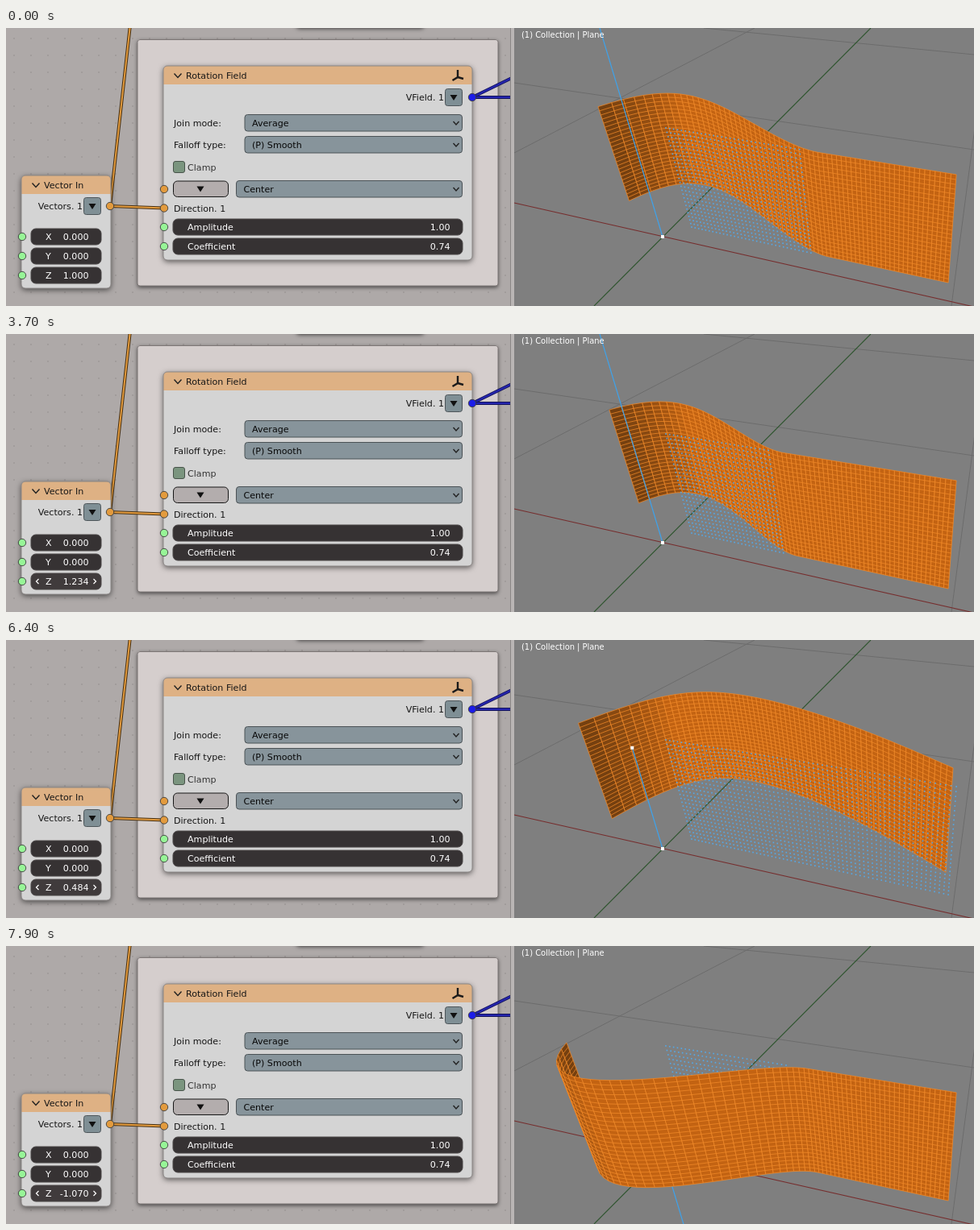
Recreate the animation shown at these times as an HTML page with a canvas. Size 1200 px wide and 345 px high, loop 8 s.

```html
<!DOCTYPE html>
<html lang="en">
<head>
<meta charset="utf-8">
<title>Rotation field</title>
<style>
html, body { margin: 0; width: 100%; height: 100%; overflow: hidden; background: #7f7f7f; }
canvas { display: block; }
</style>
</head>
<body>
<canvas id="stage" width="1200" height="345"></canvas>
<script>
const g = document.getElementById('stage').getContext('2d');
const LOOP = 8000, COLS = 64, ROWS = 25;
const X0 = 0.0758, LEN = 1.038, DEPTH = 0.0722, HEIGHT = 0.485;

// Z value over time: [ms, value]
const KEYS = [[0, 1], [2400, 1], [2500, 1.003], [2900, 1.003], [3700, 1.234], [4700, 1.9],
  [4800, 1.912], [5000, 1.912], [5800, 1], [6400, 0.484], [7200, -0.287], [7900, -1.07]];

function zAt(t) {
  const i = KEYS.findIndex(k => k[0] >= t);
  if (i < 1) return KEYS[0][1];
  const [t0, a] = KEYS[i - 1], [t1, b] = KEYS[i];
  return a + (b - a) * (t - t0) / (t1 - t0);
}

// ---------- drawing helpers ----------
function line(pts, color, width = 1) {
  g.beginPath();
  pts.forEach(p => g.lineTo(p[0], p[1]));
  g.strokeStyle = color;
  g.lineWidth = width;
  g.stroke();
}

function box(x, y, x2, y2, r, fill, border) {
  g.beginPath();
  g.roundRect(x, y, x2 - x, y2 - y, r);
  g.fillStyle = fill;
  g.fill();
  if (border) {
    g.strokeStyle = border;
    g.lineWidth = 1;
    g.stroke();
  }
}

function text(s, x, y, color = '#161616', align = 'left', size = 11.1) {
  g.font = size + 'px "DejaVu Sans", sans-serif';
  g.textAlign = align;
  g.textBaseline = 'alphabetic';
  g.fillStyle = color;
  g.fillText(s, x, y);
}

function socket(x, y, color) {
  g.beginPath();
  g.arc(x, y, 4.7, 0, 7);
  g.fillStyle = color;
  g.fill();
  g.strokeStyle = '#3c3c3c';
  g.lineWidth = 0.9;
  g.stroke();
}

function triangle(x, y) {
  g.beginPath();
  g.moveTo(x - 4.5, y - 3);
  g.lineTo(x + 4.5, y - 3);
  g.lineTo(x, y + 4);
  g.fillStyle = '#111';
  g.fill();
}

function chevron(x, y, w, h, color = '#222') {
  line([[x - w, y - h], [x, y + h], [x + w, y - h]], color, 1.4);
}

function wire(pts, dark, light) {
  line(pts, dark, 4);
  line(pts, light, 2);
}

function shadow(on, blur = 7) {
  g.shadowColor = on ? 'rgba(0,0,0,.6)' : 'transparent';
  g.shadowBlur = on ? blur : 0;
  g.shadowOffsetY = on ? 2 : 0;
}

// ---------- node editor ----------
function node(x, y, x2, y2, title) {
  shadow(true);
  box(x, y, x2, y2, 5, '#d4d4d4');
  shadow(false);
  box(x, y, x2, y + 23, [5, 5, 0, 0], '#deb184');
  box(x, y, x2, y2, 5, 'transparent', '#8b8786');
  chevron(x + 18, y + 12, 4.5, 2.5);
  text(title, x + 28, y + 15.5);
}

function dropButton(x, y) {
  box(x, y, x + 21, y + 21, 3, '#7f8f95', '#4d5559');
  triangle(x + 10.5, y + 10.5);
}

function menu(x, y, label) {
  box(x, y, 565.5, y + 20.5, 3.5, '#87949b', '#4b5256');
  text(label, x + 9, y + 14.5, '#080808');
  chevron(558, y + 10.5, 3.5, 2);
}

function field(x, y, x2, label, value, hover) {
  box(x, y, x2, y + 20, 6, hover ? '#403b3c' : '#363233', '#4a4647');
  text(label, x + 18, y + 14, '#fff');
  text(value, x2 - 15.5, y + 14, '#fff', 'right');
  if (!hover) return;
  for (const [cx, d] of [[x + 8, 1], [x2 - 8, -1]])
    line([[cx + 1.5 * d, y + 7], [cx - 1.5 * d, y + 10], [cx + 1.5 * d, y + 13]], '#fff', 1.2);
}

function editor(t, z) {
  g.fillStyle = '#aea9a8';
  g.fillRect(0, 0, 630, 345);
  g.fillStyle = '#a19c9b';
  for (let x = 9; x < 625; x += 21)
    for (let y = 12; y < 345; y += 21) g.fillRect(x, y, 2, 2);

  shadow(true, 5);
  box(360, -12, 518, -1, 4, '#8d8988');
  box(163, 14, 610, 320, 3, '#d5cecd');
  shadow(false);
  box(163, 14.5, 610, 320, 3, 'transparent', '#7d7776');

  const brown = '#4a3213', amber = '#e29a3d';
  wire([[129, 221], [132, 194], [142, 104], [154, -4]], brown, amber);
  wire([[129, 221], [196, 223.5]], brown, amber);
  wire([[578, 86], [628, 61.5]], '#14145e', '#2525ae');
  wire([[578, 86], [628, 86]], '#14145e', '#2525ae');

  node(195, 47, 578, 288, 'Rotation Field');
  line([[560, 52], [560, 61], [553.5, 65]], '#1b1b1b', 2.4);
  line([[560, 61], [567, 63]], '#1b1b1b', 2.4);
  text('VField. 1', 543, 89.5, undefined, 'right');
  dropButton(544.5, 75.5);
  text('Join mode:', 208, 122);
  menu(296, 107.5, 'Average');
  text('Falloff type:', 208, 149);
  menu(296, 134.5, '(P) Smooth');
  box(207.5, 165.5, 221.5, 179.5, 2.5, '#7b957f', '#48534a');
  text('Clamp', 225, 177, '#343434');
  box(207.5, 190, 275.5, 209.5, 5, '#b3adad', '#161616');
  triangle(241, 199.5);
  menu(285.5, 189.5, 'Center');
  text('Direction. 1', 208, 227.5);
  field(207, 237, 566, 'Amplitude', '1.00');
  field(207, 261, 566, 'Coefficient', '0.74');

  node(19, 183, 130, 323, 'Vector In');
  text('Vectors. 1', 95, 225, undefined, 'right');
  dropButton(96.5, 210.5);
  field(31, 249, 118, 'X', '0.000');
  field(31, 273, 118, 'Y', '0.000', t >= 1600 && t < 1800);
  field(31, 297, 118, 'Z', z.toFixed(3), t >= 1800);

  const orange = '#e39b3e', green = '#97f597';
  [[129, 221], [196, 200], [196, 223.5]].forEach(p => socket(...p, orange));
  [[196, 247], [196, 271], [20, 259], [20, 283], [20, 307]].forEach(p => socket(...p, green));
  socket(578, 86, '#1c1ce8');

  g.fillStyle = '#b9b5b4';
  g.fillRect(626, 0, 4, 345);
  g.fillStyle = '#8a8786';
  g.fillRect(625, 0, 1, 345);
}

// ---------- 3D view ----------
// Perspective through the three vanishing points of the axes.
function project(x, y, z) {
  const a = -0.13 * x, b = 0.54 * y, c = -0.24 * z, w = 1 + a + b + c;
  return [(814 - 1258 * a + 1240 * b + 1101 * c) / w,
          (259 - 210 * a - 175 * b + 1212 * c) / w];
}

// Shift of the sheet at distance u along it, with smooth falloff.
function push(u, z) {
  const m = Math.max(Math.abs(z), 0.02);
  const power = Math.min(1.6, Math.max(1, 2.16 - 1.16 * m));
  const k = Math.min(1, (Math.hypot(X0 + LEN * u, DEPTH) * m / 0.67) ** power);
  const f = 1 - k * k * (3 - 2 * k);
  const turn = 1 - (1 - 0.15 * m * m) * Math.exp(-8 * u);
  return { f, dx: -0.41 * f * (1 - 0.05 * m * m) * (1 - 0.75 * u * u),
           dy: 0.46 * f * turn * (z < 0 ? -1 : 1) };
}

function column(i, z) {
  const u = i / COLS, p = push(u, z), pts = [];
  for (let j = 0; j <= ROWS; j++)
    pts.push(project(X0 + LEN * u + p.dx, DEPTH + p.dy, HEIGHT * (1 - j / ROWS)));
  return pts;
}

function mesh(z) {
  let prev = column(0, z);
  for (let i = 1; i <= COLS; i++) {
    const next = column(i, z), s = Math.min(1, 0.1 + i / COLS / 0.16);
    g.beginPath();
    [prev[0], next[0], next[ROWS], prev[ROWS]].forEach(p => g.lineTo(...p));
    g.fillStyle = `rgb(${98 + 97 * s},${56 + 43 * s},${16 + 2 * s})`;
    g.fill();
    g.beginPath();
    for (let j = 0; j <= ROWS; j++) {
      g.moveTo(...prev[j]);
      g.lineTo(...next[j]);
    }
    for (const c of [prev, next]) {
      g.moveTo(...c[0]);
      g.lineTo(...c[ROWS]);
    }
    g.strokeStyle = '#f28a29';
    g.lineWidth = 0.75;
    g.stroke();
    prev = next;
  }
}

function restDots(z) {
  g.fillStyle = '#52a9ea';
  for (let i = 0; i <= COLS; i++) {
    const u = i / COLS;
    if (push(u, z).f < 0.03) continue;
    for (let j = 0; j <= ROWS; j++) {
      const [x, y] = project(X0 + LEN * u, DEPTH, HEIGHT * j / ROWS);
      g.fillRect(x - 0.8, y - 0.8, 1.6, 1.6);
    }
  }
}

function arrow(z) {
  const from = project(0, 0, 0), to = project(0, 0, z);
  line([from, to], '#3fa2ea', 1.2);
  g.fillStyle = '#fff';
  for (const [x, y] of [from, to]) g.fillRect(x - 2, y - 2, 4, 4);
}

function view(z) {
  g.fillStyle = '#7f7f7f';
  g.fillRect(630, 0, 570, 345);
  const grid = '#6c6c6c';
  line([[630, 68], [1200, 151]], grid);
  line([[865, 0], [1200, 33]], grid);
  line([[630, 155], [928, 0]], grid);
  line([[1172, 345], [1212, 40]], grid);
  line([[630, 217], [1200, 346]], '#762e2e', 1.1);
  line([[729, 345], [1072, 0]], '#2f552f', 1.1);
  if (z < 0) {
    restDots(z);
    arrow(z);
    mesh(z);
  } else {
    mesh(z);
    restDots(z);
    arrow(z);
  }
  text('(1) Collection | Plane', 639, 12, '#fff', 'left', 9.9);
}

function draw(now) {
  const t = Math.floor(now % LOOP / 100) * 100, z = zAt(t);
  view(z);
  editor(t, z);
  requestAnimationFrame(draw);
}
requestAnimationFrame(draw);
</script>
</body>
</html>
```
